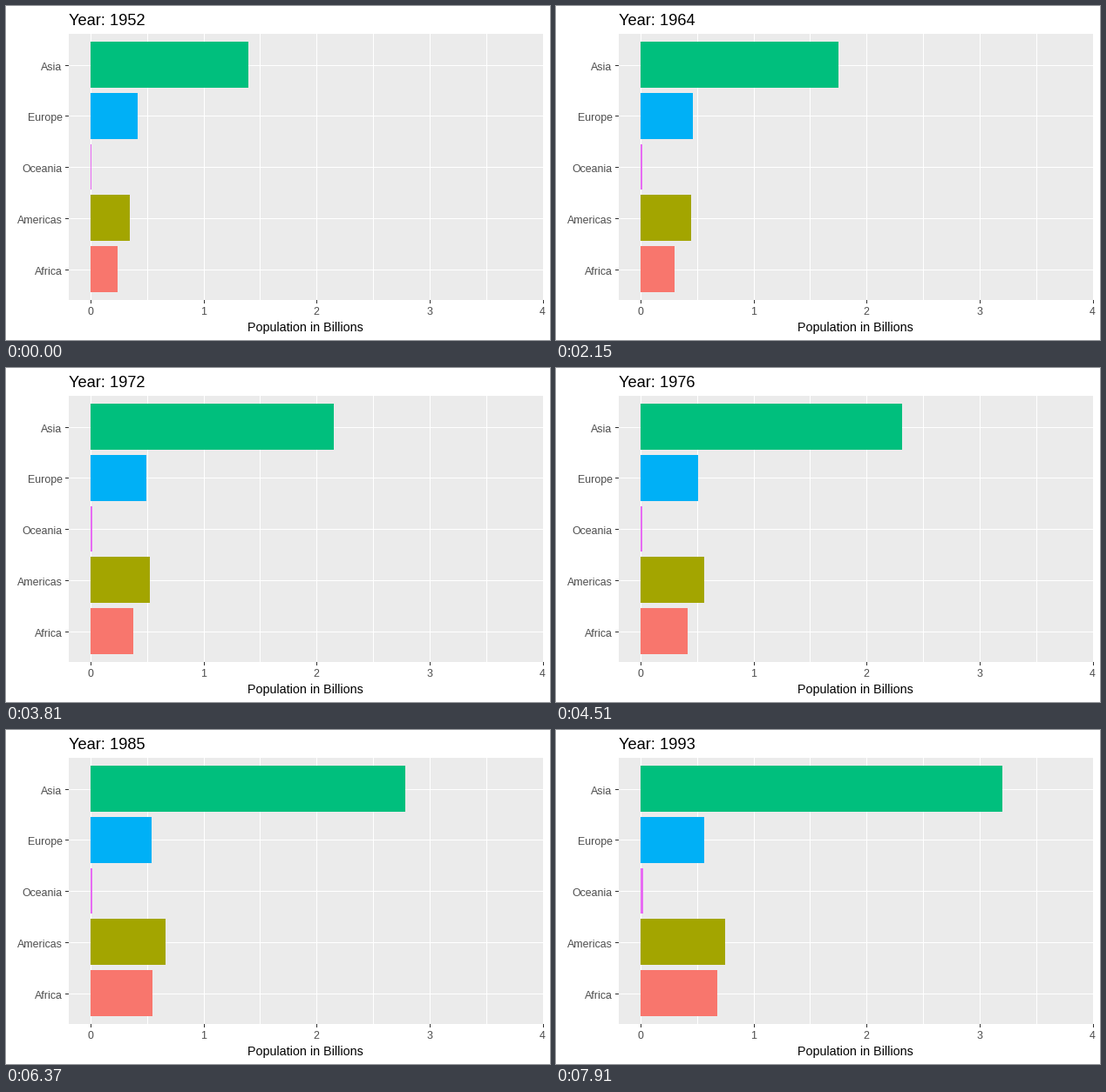
Recreate the animation shown at these times as a matplotlib script. Size 624x384 px, loop 8000 ms.

```python
import numpy as np
import matplotlib.pyplot as plt
from matplotlib.animation import FuncAnimation
from matplotlib.patches import Rectangle

W, H, DPI = 624, 384, 96
LOOP, TICK = 8000, 20          # ms
START, YEARS_PER_STEP = 1952, 0.24
LEFT, TOP, RIGHT, BOTTOM = 72, 32, 616, 338
MIDDLE, ROW = 185.02, 58.75
GREY, DARK = "#4D4D4D", "#333333"

# Billions at the start, growth per decade, its change, size of the 1964 slump
REGIONS = [
    ("Asia", "#00BF7D", 1.395, 0.329, 0.0265, 0.058),
    ("Europe", "#00B0F6", 0.418, 0.0455, -0.0026, 0),
    ("Oceania", "#E76BF3", 0.0107, 0.00255, 0, 0),
    ("Americas", "#A3A500", 0.345, 0.0855, 0.0032, 0),
    ("Africa", "#F8766D", 0.2376, 0.040, 0.0162, 0),
]

plt.rcParams["font.family"] = "Liberation Sans"
fig = plt.figure(figsize=(W / DPI, H / DPI), dpi=DPI, facecolor="white")
ax = fig.add_axes([0, 0, 1, 1])
ax.set_xlim(0, W)
ax.set_ylim(H, 0)
ax.axis("off")


def snap(v):
    return int(np.floor(v + 0.5))


def grid_x(value):
    return snap(97 + value * 129.65)


def bar_x(value):
    return snap(96.8 + value * 129.68)


def population(decades, start, growth, change, slump):
    dip = slump * np.exp(-((decades - 1.25) / 0.45) ** 2)
    return start + growth * decades + change * decades ** 2 - dip


def box(x0, y0, x1, y1, color, z=1):
    return ax.add_patch(Rectangle((x0, y0), x1 - x0, y1 - y0, facecolor=color,
                                  linewidth=0, antialiased=False, zorder=z))


def label(x, y, text, px, color="black", ha="left"):
    return ax.text(x, y, text, fontsize=px * 72 / DPI, color=color,
                   ha=ha, va="baseline")


# Panel, vertical grid and x axis
box(LEFT, TOP, RIGHT, BOTTOM, "#EBEBEB", 0)
for half in range(9):
    x = grid_x(half / 2)
    box(x, TOP, x + 1, BOTTOM, "white")
    if half % 2 == 0:
        box(x, BOTTOM, x + 1, BOTTOM + 4, DARK)
        label(x - 0.5, 355, str(half // 2), 12.4, GREY, "center")

# Horizontal grid, y axis and bars
bars = []
for i, (name, color, *trend) in enumerate(REGIONS):
    mid = MIDDLE + ROW * (i - 2)
    y = snap(mid)
    box(LEFT, y, RIGHT, y + 1, "white")
    box(LEFT - 4, y, LEFT, y + 1, DARK)
    label(64.5, y + 6, name, 12.4, GREY, "right")
    bar = box(bar_x(0), snap(mid - 0.45 * ROW), bar_x(1),
              snap(mid + 0.45 * ROW), color, 2)
    bars.append((bar, trend))

title = label(71.5, 22, "", 18.3)
label((LEFT + RIGHT) / 2 - 0.5, 374, "Population in Billions", 14.3,
      ha="center")

# Every third step is held longer; the motion skips ahead once
steps = [s for s in range(173) if s not in (25, 26)]
holds = [50 if s == 27 else 100 if s % 3 == 1 else 20 for s in steps]
starts = np.concatenate(([0], np.cumsum(holds)[:-1]))


def draw(n):
    now = n * TICK + TICK / 2
    step = steps[np.searchsorted(starts, now, side="right") - 1]
    elapsed = YEARS_PER_STEP * step
    title.set_text(f"Year: {round(START + elapsed)}")
    for bar, trend in bars:
        bar.set_width(bar_x(population(elapsed / 10, *trend)) - bar_x(0))
    return [title] + [bar for bar, _ in bars]


anim = FuncAnimation(fig, draw, frames=LOOP // TICK, interval=TICK,
                     repeat=True, repeat_delay=0, blit=False)
plt.show()
```
